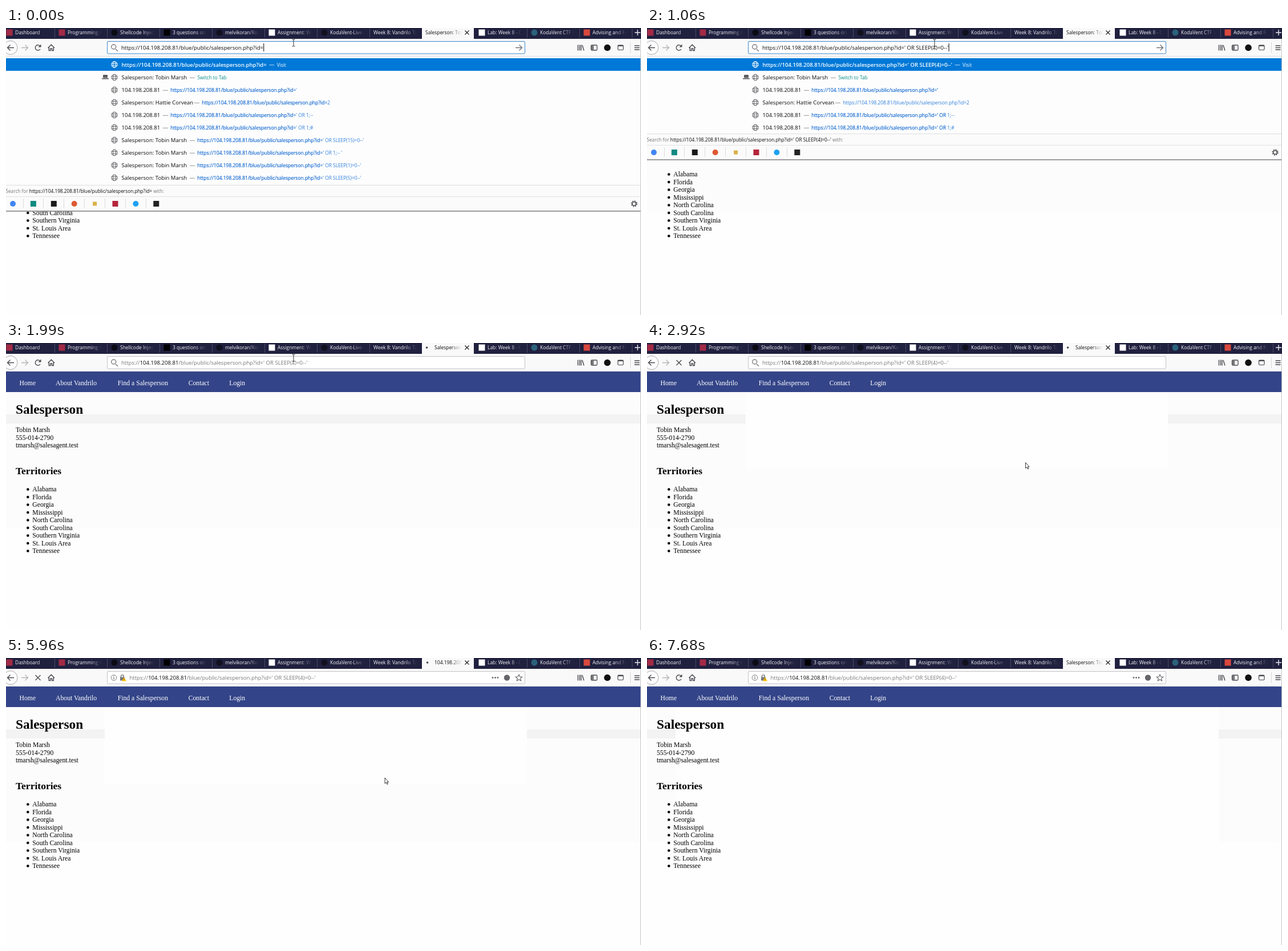
Recreate the animation shown at these times as an HTML page. Size 1113 by 503 pixels, loop 7780 ms.

```html
<!DOCTYPE html>
<html lang="en">
<head>
<meta charset="utf-8">
<title>Browser session</title>
<style>
html, body { margin: 0; width: 100%; height: 100%; overflow: hidden; background: #fefefe; }
svg { display: block; }
text { font-family: "Open Sans", "Noto Sans", sans-serif; }
.page text { font-family: "Liberation Serif", "Noto Serif", serif; font-size: 11.7px; fill: #000; }
.page .nav text { fill: #fff; }
.page .h1 { font-size: 23.4px; font-weight: bold; }
.page .h2 { font-size: 17.55px; font-weight: bold; }
.tab { font-size: 8.45px; fill: #f4f4f8; }
.big { font-size: 9.57px; fill: #0c0c0d; }
.url { font-size: 8.33px; fill: #2f7fdd; }
.hit { font-size: 8.46px; fill: #0a63d0; stroke: #0a63d0; stroke-width: .15px; }
.label { font-size: 8.27px; fill: #777; }
.line { fill: none; stroke: #4a4a4f; stroke-width: 1.4; }
</style>
</head>
<body>
<svg id="stage" width="1113" height="503" viewBox="0 0 1113 503"></svg>
<script>
const LOOP = 7780;
const HOST = "104.198.208.81";
const PATH = "/blue/public/salesperson.php?id=";
const BASE = "https://" + HOST + PATH;
const QUERY = "' OR SLEEP(4)=0--'";
const SELLER = "Tobin Marsh";
const BAR = "#20203f";

const rect = (x, y, w, h, fill, more = "") =>
  `<rect x="${x}" y="${y}" width="${w}" height="${h}" fill="${fill}" ${more}/>`;
const disc = (x, y, r, fill, more = "") =>
  `<circle cx="${x}" cy="${y}" r="${r}" fill="${fill}" ${more}/>`;
const text = (x, y, s, cls = "", more = "") =>
  `<text x="${x}" y="${y}" class="${cls}" ${more}>${s}</text>`;
const path = (d, more = "") => `<path class="line" d="${d}" ${more}/>`;
const group = (id, body, more = "") => `<g id="${id}" ${more}>${body}</g>`;
const mark = (shape, x, y, fill, r = 5.5) =>
  shape === "o" ? disc(x, y, r, fill) : rect(x - r, y - r, 2 * r, 2 * r, fill);

function globe(y, color) {
  return `<g fill="none" stroke="${color}" stroke-width="1" transform="translate(190 ${y})">
    <circle r="5.2"/><ellipse rx="2.4" ry="5.2"/><path d="M-5 -1.8H5M-5 1.8H5"/></g>`;
}

// Tab strip
const tabs = [
  ["Dashboard", "s", "#a32a46"],
  ["Programming As", "s", "#a32a46"],
  ["Shellcode Injection", "o", "#0b0b14"],
  ["3 questions on t", "s", "#000"],
  ["melvikoran/Kod", "o", "#11111f"],
  ["Assignment: Week", "s", "#fff"],
  ["KodaVent-Live-S", "o", "#11111f"],
  ["Week 8: Vandrilo Tas"],
  null,
  ["Lab: Week 8 - CT", "s", "#fff"],
  ["KodaVent CTF | K", "o", "#2b627c"],
  ["Advising and For", "s", "#d8483e"]
];

function tabStrip() {
  let out = rect(0, 0, 1113, 19, BAR);
  tabs.forEach((tab, i) => {
    const x = -7 + 92 * i;
    if (!tab) return;
    const [name, shape, color] = tab;
    const dx = shape ? 23 : 7;
    out += `<svg x="${x}" y="0" width="83" height="19">${text(dx, 11, name, "tab")}
      ${rect(61, 0, 22, 19, "url(#fadeDark)")}</svg>`;
    if (shape) out += mark(shape, x + 13, 8, color);
    if (i !== 7) out += rect(x + 92, 1, 1, 16, "#4b4b66");
  });
  out += rect(729, 0, 91, 19, "#f9f9fa");
  out += `<svg x="729" y="0" width="70" height="19">${text(6, 11, "", "tab", 'id="title" style="fill:#0c0c0d"')}
    ${rect(50, 0, 20, 19, "url(#fadeLight)")}</svg>`;
  out += disc(738, 8, 1.8, "#444", 'id="dot"');
  out += path("M804.5 4.5l7 7M811.5 4.5l-7 7", 'style="stroke:#222;stroke-width:1.2"');
  out += path("M1102 8h10M1107 3v10", 'style="stroke:#e8e8f0"');
  return out;
}

// Toolbar
function toolbar() {
  let out = rect(0, 19, 1113, 31, "#f9f9fa") + rect(0, 49, 1113, 1, "#dcdcdf");
  out += disc(8, 34.5, 12, "#fdfdfd", 'stroke="#a9a9ad" stroke-width="1"');
  out += path("M3 34.5H14M7.5 29.5l-5 5 5 5");
  out += path("M27 34.5H38M33.5 29.5l5 5-5 5", 'style="stroke:#b4b4b7"');
  out += group("reload", path("M60 32A4.7 4.7 0 1 0 60 37") +
    '<path d="M61.5 28.5v5h-5z" fill="#4a4a4f"/>');
  out += group("stop", path("M51.5 30l9 9M60.5 30l-9 9"));
  out += path("M73.5 35L79.3 29.3 85 35M75.3 34v5.5H78V36h2.6v3.5h2.7V34");
  out += rect(177.5, 23.5, 732, 21.5, "#fff", 'id="field" rx="1.5"');
  out += group("lens", path("M192 37l4 3.6", 'style="stroke:#808084;stroke-width:1.6"') +
    disc(188.7, 33, 4, "none", 'stroke="#808084" stroke-width="1.5"'));
  out += group("go", path("M893 34.5h11M899.5 29.5l5 5-5 5", 'style="stroke:#737377"'));
  out += group("site",
    disc(189, 34.5, 4.8, "none", 'stroke="#77777a"') + rect(188.4, 33.6, 1.3, 3.6, "#77777a") +
    rect(188.4, 31.4, 1.3, 1.3, "#77777a") +
    path("M201.5 34v-2a2.4 2.4 0 0 1 4.8 0v2", 'style="stroke:#77777a"') +
    rect(200, 33.5, 8, 6, "#77777a") +
    '<path d="M207 33.5l4 7h-8z" fill="#ffbf00"/>' + rect(206.6, 35.8, .9, 2.5, "#5a4300") +
    [853, 857.5, 862].map(x => disc(x, 34.5, 1.4, "#66666a")).join("") +
    disc(878, 34.5, 5.2, "#66666a") +
    path("M899 29l1.7 3.7 4 .4-3 2.7.9 4-3.6-2.1-3.6 2.1.9-4-3-2.7 4-.4z",
      'style="stroke:#66666a;stroke-width:1.1"'));
  out += text(202, 38.3, "", "big", 'id="typed"');
  out += `<text id="address" y="38.3" class="big" style="fill:#77777a">https://<tspan
    fill="#0c0c0d">${HOST}</tspan>${PATH}${QUERY}</text>`.replace(/\s+fill/, " fill");
  out += rect(0, 27, 1, 14, "#000", 'id="caret"');
  out += path("M1002.5 29.5v10M1005.5 29.5v10M1008 29.5v10M1010 30l3 9.5");
  out += rect(1025.5, 30, 10.5, 9, "none", 'rx="1.5" stroke="#4a4a4f" stroke-width="1.3"') +
    rect(1026, 30.5, 4.2, 8, "#77777b");
  out += disc(1054, 34.5, 5.8, "#111");
  out += rect(1072.5, 30, 9.5, 8.5, "none", 'rx="1.5" stroke="#4a4a4f" stroke-width="1.2"') +
    rect(1072.5, 30, 9.5, 2, "#4a4a4f");
  out += rect(1094, 25, 1, 19, "#d7d7db");
  out += path("M1101.5 31h9M1101.5 34.5h9M1101.5 38h9");
  return out;
}

// Web page
const places = ["Alabama", "Florida", "Georgia", "Mississippi", "North Carolina",
  "South Carolina", "Southern Virginia", "St. Louis Area", "Tennessee"];

function webPage() {
  let out = rect(0, 50, 1113, 453, "#fefefe") + rect(0, 50, 1113, 273, "#fcfcfc");
  out += rect(0, 125, 1113, 16, "#f3f3f3");
  out += rect(0, 86, 0, 0, "#fefefe", 'id="clean"');
  out += rect(0, 50, 1113, 36, "#334488") + '<g class="nav">';
  [[23.5, "Home"], [87, "About Vandrilo"], [195.7, "Find a Salesperson"], [319.7, "Contact"], [391.3, "Login"]]
    .forEach(([x, s]) => out += text(x, 73.5, s));
  out += "</g>" + text(17, 124, "Salesperson", "h1");
  [SELLER, "555-014-2790", "tmarsh@salesagent.test"]
    .forEach((s, i) => out += text(17, 156 + 13.5 * i, s));
  out += text(17, 230, "Territories", "h2");
  places.forEach((s, i) => {
    const y = 260 + 13.5 * i;
    out += disc(38.3, y - 3.5, 2.3, "#000") + text(46.3, y, s);
  });
  return out;
}

// Suggestion popup
const agent = "Salesperson: " + SELLER;
const history = [
  [HOST, 275, "'"],
  ["Salesperson: Hattie Corvean", 330, "2"],
  [HOST, 275, "' OR 1;--"],
  [HOST, 275, "' OR 1;#"],
  [agent, 322, "' OR SLEEP(15)=0--'"],
  [agent, 322, "' OR 1;-- '"],
  [agent, 322, "' OR SLEEP(1)=0--'"],
  [agent, 322, "' OR SLEEP(5)=0--'"]
];
const dash = (x, y) => rect(x, y, 9, .9, "#8a8a8e");

function popup() {
  let rows = rect(0, 0, 1113, 300, "#fdfdfd") + rect(0, 3, 1112, 22, "#0078d7") + globe(14, "#fff");
  rows += text(202.5, 17.7, "", "", 'id="first" font-size="9.5" font-weight="600" fill="#fff"');
  rows += group("visit", rect(4.5, 14.4, 9, .9, "#cfe5fa") + text(18, 17.7, "Visit", "url", 'style="fill:#fff"'));
  rows += rect(170, 32, 8, 5.5, "#5d5d61", 'rx="1"') + rect(168, 38, 12, 1.6, "#5d5d61") + globe(36.5, "#66666a");
  rows += text(202.5, 40, agent, "big") + dash(322, 36.8) +
    text(335.5, 40, "Switch to Tab", "url", 'style="fill:#058b8c"');
  history.forEach(([name, x], i) => {
    const y = 58.5 + 22 * i;
    rows += globe(y, "#66666a") + text(202.5, y + 3.7, name, "big") + dash(x, y + .3);
    rows += `<text x="${x + 13.2}" y="${y + 3.7}" class="url"><tspan id="hit${i}"></tspan><tspan id="rest${i}"></tspan></text>`;
  });

  let foot = rect(0, -45, 1113, 45, "#fbfbfb") + rect(0, -45, 1113, 1, "#dedee0");
  foot += rect(258, -43, 374, 13, "#f0f0f0", 'id="patch"');
  foot += text(-.6, -31, `Search for <tspan id="term" fill="#0c0c0d"></tspan> with:`, "label");
  foot += rect(0, -25, 1113, 1, "#e1e1e3");
  [["o", "#4285f4"], ["s", "#0f8a82"], ["s", "#1a1a1a"], ["o", "#de5833"],
    ["s", "#d9b24a"], ["s", "#b5243a"], ["o", "#1da1f2"], ["s", "#222"]].forEach(([shape, color], i) => {
    const x = 12 + 35.9 * i;
    foot += mark(shape, x, -12, color, i === 4 ? 3.5 : 5);
    if (i < 7) foot += rect(Math.round(x + 17.5), -21, 1, 17, "#dcdcde");
  });
  foot += disc(1101, -12, 3.3, "none", 'stroke="#55555a" stroke-width="1.6"') +
    disc(1101, -12, 4.8, "none", 'stroke="#55555a" stroke-width="1.8" stroke-dasharray="1.9 1.87"');
  foot += rect(0, 0, 1113, 1.8, "#929296");
  return `<svg id="list" x="0" y="50" width="1113" height="225">${rows}</svg>` + group("foot", foot);
}

const fade = (id, color) => `<linearGradient id="${id}">
  <stop offset="0" stop-color="${color}" stop-opacity="0"/><stop offset="1" stop-color="${color}"/></linearGradient>`;

const $ = id => document.getElementById(id);
$("stage").innerHTML = `<defs>${fade("fadeDark", BAR)}${fade("fadeLight", "#f9f9fa")}</defs>` +
  group("web", webPage(), 'class="page"') + group("popup", popup()) + tabStrip() + toolbar() +
  rect(1112, 19, 1, 484, "#c4c4c8") +
  group("beam", path("M-2.5 -6h2l.5 .6 .5-.6h2M0 -5.5v11M-2.5 6h2l.5-.6 .5 .6h2", 'style="stroke:#333;stroke-width:1"')) +
  group("arrow", '<path d="M.5 .5v10l2.2-2 1.6 3.5 1.6-.7-1.6-3.4h2.8z" fill="#fff" stroke="#222" stroke-width=".9"/>');

const show = (id, on) => $(id).setAttribute("display", on ? "inline" : "none");
const set = (id, attrs) => { for (const k in attrs) $(id).setAttribute(k, attrs[k]); };
const write = (id, s) => { if ($(id).textContent !== s) $(id).textContent = s; };

// Latest value whose start time has passed
const at = (t, steps) => steps.reduce((v, [time, next]) => t >= time ? next : v, steps[0][1]);

const route = [[2140, 504, 26], [2400, 590, 78], [2660, 690, 180], [2790, 671, 207], [2920, 663, 209],
  [5960, 663, 209], [6480, 805, 315], [7010, 995, 440], [7280, 1075, 506]];

function mouseAt(t) {
  if (t <= route[0][0]) return route[0].slice(1);
  for (let i = 1; i < route.length; i++) {
    const [t0, x0, y0] = route[i - 1], [t1, x1, y1] = route[i];
    if (t <= t1) {
      const k = (t - t0) / (t1 - t0);
      return [x0 + (x1 - x0) * k, y0 + (y1 - y0) * k];
    }
  }
  return route[route.length - 1].slice(1);
}

const BEAT = 131.8;
const hold = t => 2140 + Math.floor((t - 2140) / BEAT + .1) * BEAT;

function draw(t) {
  const open = t < 1990, loading = t >= 1990 && t < 6350, landed = t >= 5960;
  const tick = hold(t);

  const typed = BASE + QUERY.slice(0, at(t, [[0, 0], [270, 6], [400, 12], [670, 14], [800, 18]]));
  show("popup", open);
  show("typed", open);
  show("address", !open);
  show("go", open);
  show("lens", !landed);
  show("site", landed);
  set("field", { stroke: open ? "#3c88c8" : "#c3c3c7" });
  set("address", { x: landed ? 216.5 : 202 });

  if (open) {
    write("typed", typed);
    write("first", typed);
    write("term", t < 670 ? BASE : typed);
    show("patch", t >= 670 && t < 1060);
    set("visit", { transform: `translate(${202.5 + $("first").getComputedTextLength()} 0)` });
    set("caret", { x: 202.3 + $("typed").getComputedTextLength() });
    const bottom = at(t, [[0, 320], [1060, 230], [1190, 141], [1320, 122]]);
    set("list", { height: bottom - 95 });
    set("foot", { transform: `translate(0 ${bottom})` });
    const needle = t < 670 ? "" : "' OR";
    history.forEach(([, , tail], i) => {
      const full = BASE + tail, miss = needle && tail[0] !== "'";
      const n = miss ? 0 : BASE.length + (tail.startsWith(needle) ? needle.length : tail === "'" ? 1 : 0);
      $("hit" + i).setAttribute("class", "hit");
      write("hit" + i, full.slice(0, n));
      write("rest" + i, full.slice(n));
    });
  }
  show("caret", open && (t < 1190 || t >= 1850));

  write("title", landed && loading ? HOST : agent);
  set("title", { x: loading ? 22 : 6 });
  show("dot", loading);
  const spin = (Math.max(1990, tick) - 1990) / 965 * 2 * Math.PI;
  set("dot", { cx: 742 - 4.5 * Math.cos(spin) });

  const stopping = t >= 2270 && t < 6350;
  show("stop", stopping);
  show("reload", !stopping);
  set("reload", { opacity: t >= 6350 && t < 7010 ? .45 : 1 });

  const [x0, x1, y1] = at(t, [[0, [0, 0, 86]], [2790, [173, 913, 220]], [6350, [50, 913, 327]], [7010, [50, 1002, 503]]]);
  set("clean", { x: x0, width: x1 - x0, height: y1 - 86 });

  const [mx, my] = mouseAt(tick);
  const beam = my < 46;
  show("beam", beam);
  show("arrow", !beam && t < 7280);
  set(beam ? "beam" : "arrow", { transform: `translate(${mx} ${my})` });
}

const start = performance.now();
function frame(now) {
  draw(Math.max(0, now - start) % LOOP);
  requestAnimationFrame(frame);
}
draw(0);
requestAnimationFrame(frame);
</script>
</body>
</html>
```
